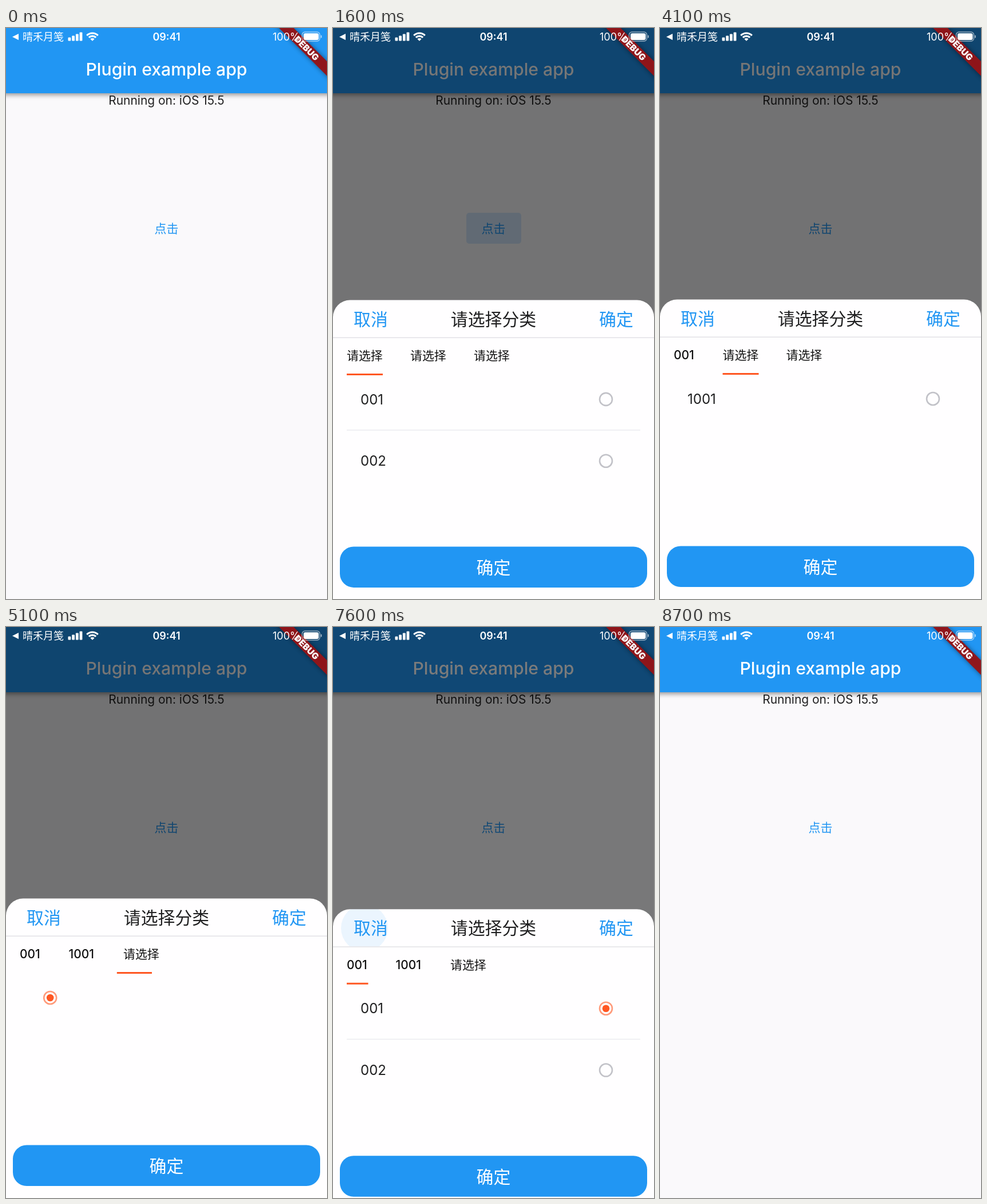
These frames come from a looping animation (561x998 px, 8800 ms). An HTML page with a canvas:

```html
<!DOCTYPE html>
<html lang="zh-CN">
<head>
<meta charset="utf-8">
<style>
  html, body { margin: 0; width: 100%; height: 100%; overflow: hidden; background: #faf9fb; }
  canvas { display: block; }
</style>
</head>
<body>
<canvas id="stage" width="561" height="998"></canvas>
<script>
const ctx = document.getElementById('stage').getContext('2d');
const W = 561, H = 998, LOOP = 8800, STEP = 100;
const BLUE = '#2196f3', ORANGE = '#ff5722', INK = '#202021';
const FONT = 'Inter, "Noto Sans CJK SC", "Noto Sans CJK", sans-serif';
const SHEET_TOP = 474.5, PAGE_LEFT = 24, PAGE_WIDTH = 513;

const clamp = v => Math.max(0, Math.min(1, v));
const mix = (a, b, k) => a + (b - a) * k;
const span = (t, start, length) => clamp((t - start) / length);

function bezier(x1, y1, x2, y2) {
  const at = (a, b, s) => 3 * (1 - s) * (1 - s) * s * a + 3 * (1 - s) * s * s * b + s ** 3;
  return x => {
    let lo = 0, hi = 1;
    for (let i = 0; i < 24; i++) {
      const mid = (lo + hi) / 2;
      if (at(x1, x2, mid) < x) lo = mid; else hi = mid;
    }
    return at(y1, y2, hi);
  };
}
const ease = bezier(.25, .1, .25, 1);
const decelerate = bezier(0, 0, .2, 1);

function text(str, x, y, size, color, weight = 400, align = 'left') {
  ctx.font = `${weight} ${size}px ${FONT}`;
  ctx.textAlign = align;
  ctx.fillStyle = color;
  ctx.fillText(str, x, y);
}
function rect(x, y, w, h, color, radius = 0) {
  ctx.fillStyle = color;
  ctx.beginPath();
  ctx.roundRect(x, y, w, h, radius);
  ctx.fill();
}
function disc(x, y, r, color) {
  ctx.fillStyle = color;
  ctx.beginPath();
  ctx.arc(x, y, r, 0, 7);
  ctx.fill();
}
function clipped(x, y, w, h, radius, paint) {
  ctx.save();
  ctx.beginPath();
  ctx.roundRect(x, y, w, h, radius);
  ctx.clip();
  paint();
  ctx.restore();
}

function drawHome(t) {
  rect(0, 0, W, H, '#faf9fb');
  ctx.save();
  ctx.shadowColor = 'rgba(0,0,0,.42)';
  ctx.shadowBlur = 8;
  ctx.shadowOffsetY = 3;
  rect(-20, -20, W + 40, 134, BLUE);
  ctx.restore();
  text('Plugin example app', W / 2, 82.5, 30.2, '#fff', 500, 'center');
  text('Running on: iOS 15.5', W / 2, 133.5, 20.95, INK, 400, 'center');

  const fade = 1 - span(t, 1600, 200);
  if (t > 1300 && fade > 0) {
    clipped(233, 323, 96, 54, 5, () => {
      rect(233, 323, 96, 54, `rgba(33,150,243,${.06 * fade})`);
      disc(276, 341, 20 + 80 * span(t, 1400, 200), `rgba(33,150,243,${.13 * fade})`);
    });
  }
  text('点击', W / 2, 357.5, 20.95, BLUE, 400, 'center');
}

function drawStatusBar() {
  ctx.fillStyle = '#fff';
  ctx.beginPath();
  ctx.moveTo(11, 15.5);
  ctx.lineTo(22, 10);
  ctx.lineTo(22, 21);
  ctx.fill();
  text('晴禾月笺', 29, 22, 18, '#fff');
  for (let i = 0; i < 4; i++) rect(108.5 + i * 6.7, 16.5 - i * 3, 4.8, 6 + i * 3, '#fff', 1);

  ctx.strokeStyle = '#fff';
  ctx.lineWidth = 3.2;
  for (const r of [13.8, 8.7]) {
    ctx.beginPath();
    ctx.arc(151, 22.8, r, -Math.PI * .75, -Math.PI * .25);
    ctx.stroke();
  }
  ctx.beginPath();
  ctx.moveTo(151, 22.8);
  ctx.arc(151, 22.8, 5, -Math.PI * .75, -Math.PI * .25);
  ctx.fill();

  text('09:41', W / 2, 21.8, 18, '#fff', 600, 'center');
  text('100%', 466, 22, 18, '#fff');
  ctx.strokeStyle = 'rgba(255,255,255,.55)';
  ctx.lineWidth = 1.5;
  ctx.beginPath();
  ctx.roundRect(517.5, 7, 31, 16, 5);
  ctx.stroke();
  rect(520, 9.2, 26.5, 11.8, '#fff', 3);
  rect(550, 12.5, 2, 5, 'rgba(255,255,255,.55)', 1);
}

function drawRibbon() {
  ctx.save();
  ctx.translate(525.5, 35.5);
  ctx.rotate(Math.PI / 4);
  ctx.shadowColor = 'rgba(0,0,0,.5)';
  ctx.shadowBlur = 9;
  rect(-70, -9, 140, 18, 'rgba(148,20,24,.96)');
  ctx.shadowColor = 'transparent';
  text('DEBUG', 0, 5.5, 15.3, '#fff', 900, 'center');
  ctx.restore();
}

// Tab changes: start time, from page, to page
const slides = [[3150, 0, 1], [4430, 1, 2], [5050, 2, 1], [5672, 1, 0]];

function tabState(t) {
  let state = { from: 0, to: 0, k: 1 };
  for (const [start, from, to] of slides) {
    if (t >= start) state = { from, to, k: ease(span(t, start, 300)) };
  }
  return state;
}

function drawTabs(t, { from, to, k }) {
  const empty = '请选择';
  const widths = { [empty]: 63, '001': 37.5, '1001': 47.5 };
  let x = 24;
  const tabs = [t >= 3100 ? '001' : empty, t >= 4400 ? '1001' : empty, empty].map(label => {
    const tab = { x, w: widths[label] };
    text(label, x, 104.4, 20.95, '#111', label === empty ? 400 : 500);
    x += tab.w + 48;
    return tab;
  });
  // The underline trails the page
  const lag = 1 - Math.sqrt(1 - k);
  rect(mix(tabs[from].x, tabs[to].x, lag), 128.5, mix(tabs[from].w, tabs[to].w, lag), 3, ORANGE);
}

function drawRow(label, x, y, selected) {
  text(label, x + 24, y + 8.7, 24, INK);
  ctx.strokeStyle = selected ? '#ff9a7a' : '#c2c2c8';
  ctx.lineWidth = 2.6;
  ctx.beginPath();
  ctx.arc(x + 453, y, 11, 0, 7);
  ctx.stroke();
  if (selected) disc(x + 453, y, 6.3, ORANGE);
}

function drawPages(t, { from, to, k }) {
  const position = mix(from, to, k);
  clipped(PAGE_LEFT, 133, PAGE_WIDTH, 290, 0, () => {
    const x = PAGE_LEFT - position * PAGE_WIDTH;
    drawRow('001', x, 173.5, t >= 3100);
    rect(x, 226.5, PAGE_WIDTH, 1.5, '#ebebef');
    drawRow('002', x, 281.3, false);
    drawRow('1001', x + PAGE_WIDTH, 173.5, t >= 4400);
  });
}

function drawSheet(t, top) {
  ctx.save();
  ctx.translate(0, top);
  rect(0, 0, W, H, '#fffeff', [30, 30, 0, 0]);
  if (t > 7500) {
    clipped(0, 0, W, 65, [30, 30, 0, 0], () => disc(55, 33, 41, 'rgba(33,150,243,.09)'));
  }
  text('取消', 36, 44.2, 29.9, BLUE);
  text('请选择分类', W / 2, 44.2, 29.9, INK, 400, 'center');
  text('确定', 465, 44.2, 29.9, BLUE);
  rect(0, 65, W, 1.5, '#e2e2e6');
  const state = tabState(t);
  drawTabs(t, state);
  drawPages(t, state);
  rect(12, 431, 537, 71.5, BLUE, 24);
  text('确定', W / 2, 478.5, 29.9, '#fff', 400, 'center');
  ctx.restore();
}

function draw(t) {
  drawHome(t);
  const open = t < 7000 ? span(t, 1400, 212) : 1 - span(t, 7550, 200);
  if (open > 0) {
    rect(0, 0, W, H, `rgba(0,0,0,${.54 * ease(open)})`);
    drawSheet(t, mix(H, SHEET_TOP, decelerate(open)));
  }
  drawRibbon();
  drawStatusBar();
}

const origin = performance.now();
function tick() {
  const t = (performance.now() - origin) % LOOP;
  draw(Math.floor(t / STEP) * STEP);
  requestAnimationFrame(tick);
}
tick();
</script>
</body>
</html>
```
